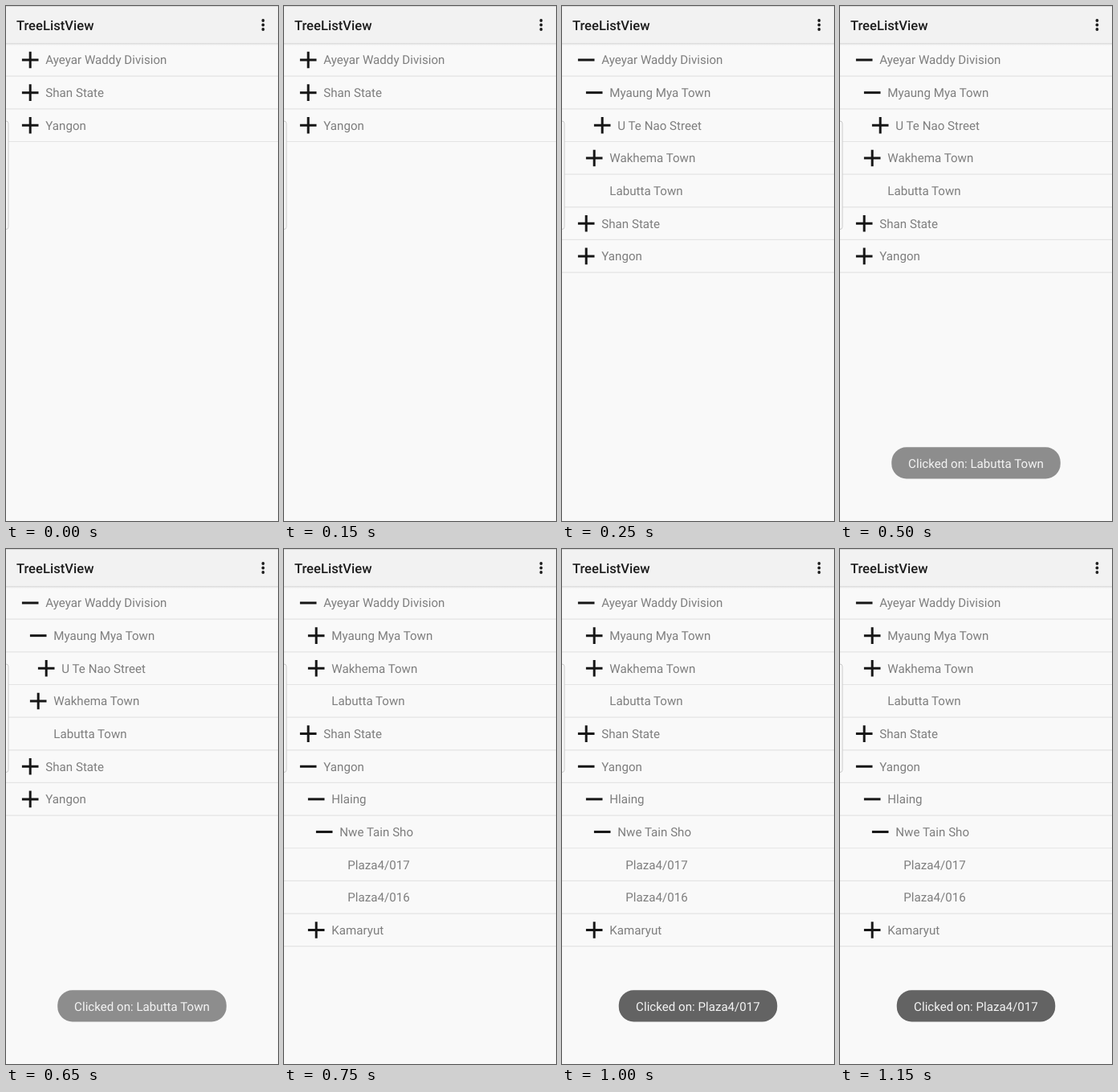
Write an HTML page that moves like this. It is 339x640 px and loops after 1250 ms.

```html
<!DOCTYPE html>
<html lang="en">
<head>
<meta charset="utf-8">
<title>Tree list</title>
<style>
  html, body { margin: 0; width: 100%; height: 100%; overflow: hidden; background: #f9f9f9; }
  svg { display: block; width: 339px; height: 640px; }
  text { font: 15.14px Roboto, sans-serif; fill: #7e7e7e; text-rendering: geometricPrecision; }
  .title { font-size: 16.6px; font-weight: 500; fill: #1c1c1c; }
  .toast text { fill: #f4f4f4; text-anchor: middle; }
  .icon { stroke: #161616; stroke-width: 3; }
  .divider { stroke: #e4e4e4; stroke-width: 1.2; }
</style>
</head>
<body>
<svg viewBox="0 0 339 640">
  <defs>
    <linearGradient id="shadow" x2="0" y2="1">
      <stop stop-color="#d8d8d8"/>
      <stop offset="1" stop-color="#f9f9f9"/>
    </linearGradient>
  </defs>
  <rect width="339" height="640" fill="#f9f9f9"/>
  <rect width="339" height="46" fill="#f2f2f2"/>
  <rect width="339" height="1" fill="#d6d6d6"/>
  <rect y="46" width="339" height="3" fill="url(#shadow)"/>
  <text class="title" x="12.9" y="29.8">TreeListView</text>
  <g fill="#222">
    <circle cx="320.4" cy="18" r="1.9"/>
    <circle cx="320.4" cy="23.5" r="1.9"/>
    <circle cx="320.4" cy="29" r="1.9"/>
  </g>
  <g id="list"></g>
  <rect x="-10" y="143" width="13" height="134.5" rx="3" fill="#fafafa" stroke="#cbcbcb"/>
  <g id="toast" class="toast"></g>
</svg>
<script>
  const STEP = 250, PITCH = 40.65;

  // Each row: one space per level, then the icon (+, - or . for none), then the label.
  const closed = ['+Ayeyar Waddy Division', '+Shan State', '+Yangon'];
  const townOpen = [
    '-Ayeyar Waddy Division', ' -Myaung Mya Town', '  +U Te Nao Street',
    ' +Wakhema Town', ' .Labutta Town', '+Shan State', '+Yangon'
  ];
  const blockOpen = [
    '-Ayeyar Waddy Division', ' +Myaung Mya Town', ' +Wakhema Town', ' .Labutta Town',
    '+Shan State', '-Yangon', ' -Hlaing', '  -Nwe Tain Sho',
    '   .Plaza4/017', '   .Plaza4/016', ' +Kamaryut'
  ];
  const states = [
    { rows: closed },
    { rows: townOpen },
    { rows: townOpen, toast: ['Labutta Town', 210.5, '#8d8d8d'] },
    { rows: blockOpen },
    { rows: blockOpen, toast: ['Plaza4/017', 197.5, '#636363'] }
  ];

  function drawRow(row, i) {
    const body = row.trimStart(), indent = 10 * (row.length - body.length);
    const x = 30.2 + indent, y = 67 + PITCH * i;
    const paths = { '+': 'M-10.3 0H10.3M0-10.3V10.3', '-': 'M-10.3 0H10.3', '.': '' };
    return `<path class="icon" transform="translate(${x} ${y})" d="${paths[body[0]]}"/>
      <text x="${x + 19.1}" y="${y + 5.4}">${body.slice(1)}</text>
      <path class="divider" d="M0 ${y + 20.2}H339"/>`;
  }

  function drawToast([label, width, color]) {
    return `<rect x="${169.5 - width / 2}" y="548.3" width="${width}" height="39.2" rx="18.5" fill="${color}"/>
      <text x="169.5" y="573.8">Clicked on: ${label}</text>`;
  }

  const list = document.getElementById('list'), toast = document.getElementById('toast');
  let shown = -1;

  function frame() {
    const index = Math.floor(performance.now() / STEP) % states.length;
    if (index !== shown) {
      const state = states[shown = index];
      list.innerHTML = state.rows.map(drawRow).join('');
      toast.innerHTML = state.toast ? drawToast(state.toast) : '';
    }
    requestAnimationFrame(frame);
  }
  frame();
</script>
</body>
</html>
```
